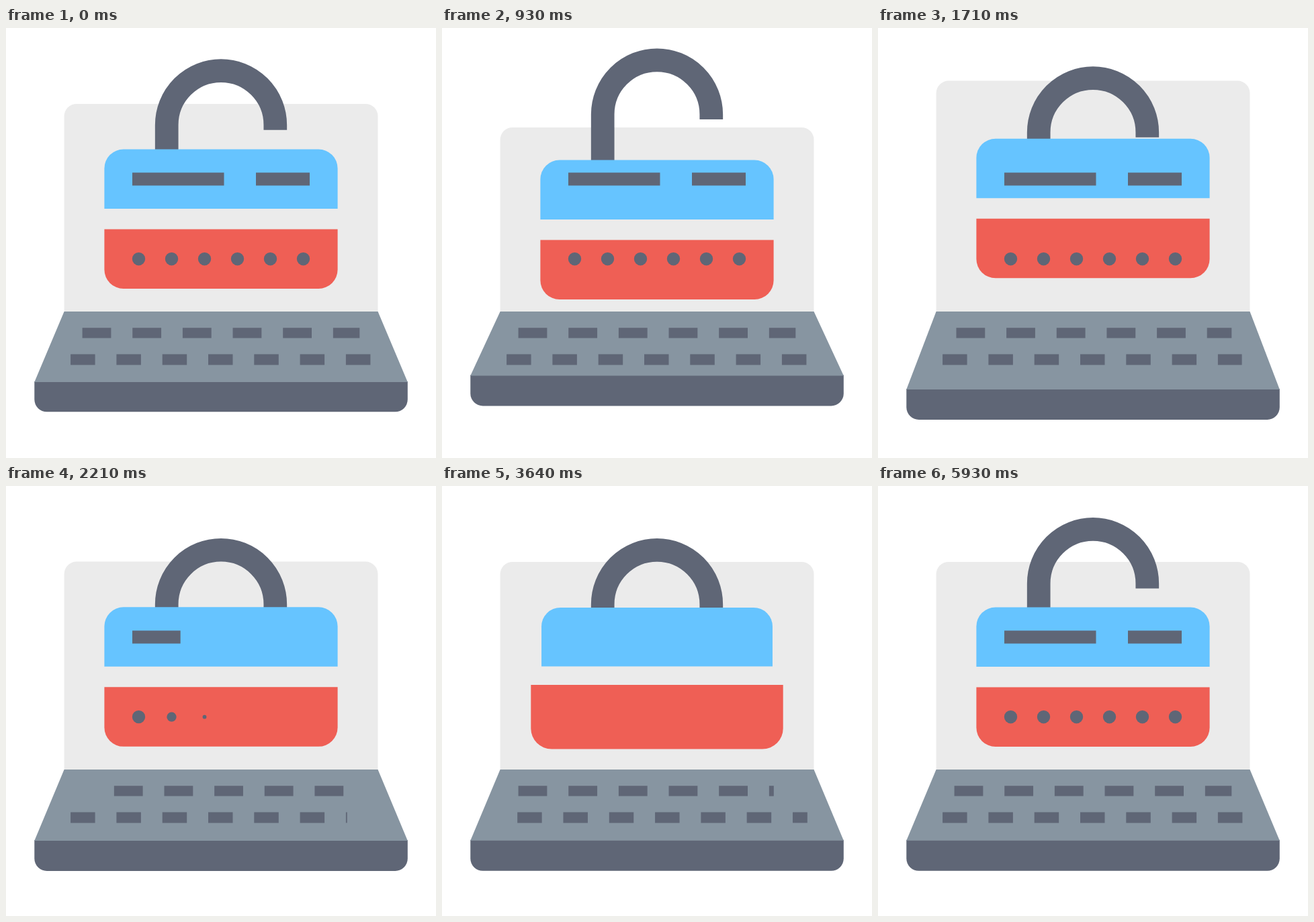
Recreate the animation shown at these times as an HTML page with a canvas. Size 640x640 px, loop 6000 ms.

```html
<!DOCTYPE html>
<html lang="en">
<head>
<meta charset="utf-8">
<title>Laptop lock</title>
<style>
  html, body { margin: 0; width: 100%; height: 100%; overflow: hidden; background: #fff; }
  canvas { display: block; width: 100vw; height: 100vh; }
</style>
</head>
<body>
<canvas id="stage" width="640" height="640"></canvas>
<script>
const ctx = document.getElementById('stage').getContext('2d');
const LOOP = 6000, MID = 320, BEAT = 800;
const DARK = '#5f6676', TRAY = '#8795a1', SCREEN = '#ebebeb', BLUE = '#66c4ff', RED = '#ef5f55';

let t = 0;

// Smooth 0 to 1 between two times
function ramp(from, to) {
  const x = Math.max(0, Math.min(1, (t - from) / (to - from)));
  return x * x * (3 - 2 * x);
}

// Smooth 0 to 1 and back to 0
const hump = (from, peak, to) => ramp(from, peak) - ramp(peak, to);

// Swell by a tenth, dip slightly below full size, settle
function swell(from, peak) {
  const low = peak + 360;
  return 1 + 0.1 * hump(from, peak, low) - 0.0095 * hump(peak, low, low + 1040);
}

// Down, up, then back to rest
const sway = () => 2 * ramp(880, 1490) - ramp(0, 880) - ramp(1620, 2246);

function box(color, x, y, w, h, radii = 0) {
  if (w <= 0) return;
  ctx.fillStyle = color;
  ctx.beginPath();
  ctx.roundRect(x, y, w, h, radii);
  ctx.fill();
}

// Dashes start at x0 and the last one is cut off at x1
function keyRow(x0, x1, y, h, dash, step) {
  for (let x = x0; x < x1; x += step) box(DARK, x, y, Math.min(dash, x1 - x), h);
}

function panel(color, cy, scale, radii) {
  const w = 347.2 * scale, h = 88.5 * scale;
  box(color, MID - w / 2, cy - h / 2, w, h, radii.map(r => r * scale));
}

function shackle() {
  const top = 46.2 - 16 * ramp(0, 1000) + 47.8 * ramp(1070, 2250) - 31.8 * ramp(5250, LOOP);
  const r = 80.8, cy = top + 98.2;
  ctx.strokeStyle = DARK;
  ctx.lineWidth = 34.7;
  ctx.beginPath();
  ctx.moveTo(MID - r, cy + 72);
  ctx.arc(MID, cy, r, Math.PI, 0);
  ctx.lineTo(MID + r, cy + 7.4);
  ctx.stroke();
}

function lock() {
  const dy = -16.7 * sway(), r = 28.5;
  shackle();
  panel(BLUE, 224.75 + dy, swell(2870, 3230), [r, r, 0, 0]);
  panel(RED, 343.75 + dy, swell(2920, 3546), [0, 0, r, r]);
}

function entry() {
  const name = 136.5, rest = 80;
  const typed = (name + rest) * (1 - ramp(1750, 2500) + ramp(3950, 5300));
  box(DARK, 188, 215.2, Math.min(typed, name), 19.2);
  box(DARK, 372, 215.2, typed - name, 19.2);

  ctx.fillStyle = DARK;
  for (let i = 0; i < 6; i++) {
    const gone = 2200 - i * 90, back = 4020 + i * 200;
    const size = 1 - ramp(gone, gone + 300) + ramp(back, back + 300);
    ctx.beginPath();
    ctx.arc(197.5 + i * 49, 343.7, 9.7 * size, 0, Math.PI * 2);
    ctx.fill();
  }
}

function base() {
  const move = 10.8 * sway(), lift = 1 - ramp(0, 880);
  const edge = 527.8 + move - 0.8 * lift;
  const bottom = 572.8 + move - 1.5 * lift;
  box(DARK, 42.3, edge - 1, 555.5, bottom - edge + 1, [0, 0, 18.5, 18.5]);

  ctx.fillStyle = TRAY;
  ctx.beginPath();
  ctx.moveTo(86.6, 422);
  ctx.lineTo(553.5, 422);
  ctx.lineTo(597.8, edge);
  ctx.lineTo(42.3, edge);
  ctx.fill();

  // Each row is trimmed at one end, then at the other a beat later
  const early = hump(2 * BEAT, 3 * BEAT, 4 * BEAT);
  const late = hump(3 * BEAT, 4 * BEAT, 3950);
  keyRow(113.6 + 55 * early, 526.3 - 88 * late, 446.2, 15.4, 42.8, 74.65);
  keyRow(96.1 + 43.5 * late, 543.8 - 42 * early, 485.5, 15.9, 36.5, 68.3);
}

function draw() {
  ctx.fillStyle = '#fff';
  ctx.fillRect(0, 0, 640, 640);
  const top = 112.9 - 36.5 * sway();
  box(SCREEN, 86.6, top, 466.9, 423 - top, [18.5, 18.5, 0, 0]);
  lock();
  entry();
  base();
}

const start = performance.now();
function frame() {
  t = (performance.now() - start) % LOOP;
  draw();
  requestAnimationFrame(frame);
}
frame();
</script>
</body>
</html>
```
